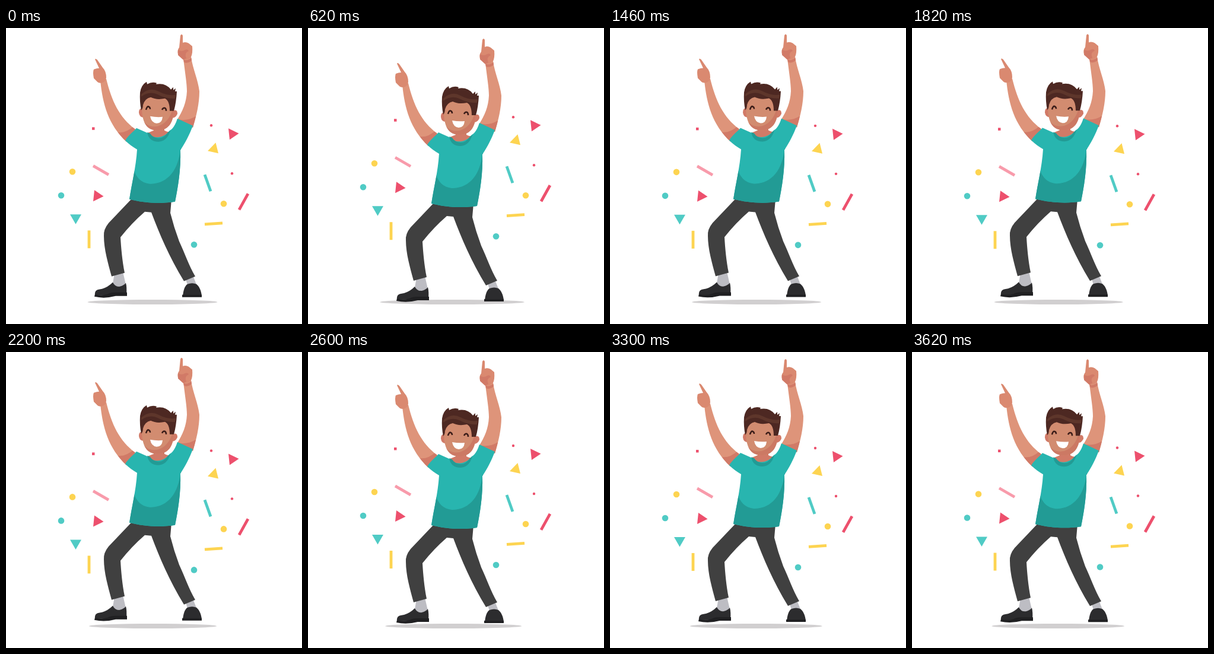
Recreate the animation shown at these times as an HTML page with a canvas. Size 499 by 499 pixels, loop 3640 ms.

```html
<!DOCTYPE html>
<html lang="en">
<head>
<meta charset="utf-8">
<title>Happy dance</title>
<style>
  html, body { margin: 0; width: 100%; height: 100%; overflow: hidden; background: #fff; }
  canvas { display: block; width: 499px; height: 499px; }
</style>
</head>
<body>
<canvas id="stage"></canvas>
<script>
const SIZE = 499, LOOP = 3640, STEP = 20, BOUNCES = 5;
const canvas = document.getElementById('stage');
const ctx = canvas.getContext('2d');
const ratio = window.devicePixelRatio || 1;
canvas.width = canvas.height = Math.round(SIZE * ratio);

const SKIN = '#de947a', HAND = '#da8970', SKIN_DARK = '#d17a67', FACE = '#d28c70';
const SHIRT = '#28b5af', SHIRT_DARK = '#229b95';
const HAIR = '#4d2822', HAIR_LIGHT = '#5e362b';
const PANTS = '#404040', SOCK = '#bdbdc3', SHOE = '#2c2c2e', SOLE = '#202022';
const PINK = '#ed506d', ROSE = '#f89bab', YELLOW = '#fdd451', TEAL = '#50cbc5';

const shape = (color, d, clip) => ({ color, path: new Path2D(d), clip: clip && new Path2D(clip) });
const line = (color, width, d) => ({ color, width, path: new Path2D(d) });

const leftArm = 'M159 89 C163 128 172 163 203 192 L218 171 C191 151 178 123 169 86 Z';
const rightArm = 'M299 52 C302 77 305 94 305 107 C304 126 298 140 288 156 L315 168 C321 148 326 128 326 107 C324 88 315 70 312 49 Z';
const shirt = 'M220 169 L238 177 C248 188 266 187 276 173 C282 170 286 162 289 153 L315 165 ' +
  'C309 181 302 194 294 206 C295 239 290 268 285 293 C260 297 232 295 208 289 ' +
  'C212 262 219 236 221 205 C214 201 207 196 201 190 C206 181 214 176 220 169 Z';
const face = 'M229 128 Q230 114 243 114 L272 114 Q282 116 283 132 C284 157 275 173 256 173 C237 173 228 160 229 128 Z';

const dancer = [
  // feet and legs
  shape(SOCK, 'M183 413 L197 411 L202 433 Q190 441 180 431 Z'),
  shape(SOCK, 'M303 424 L316 420 L322 435 L307 437 Z'),
  shape(SHOE, 'M150 451 C149 442 154 441 162 440 Q172 437 180 429 Q184 437 192 436 Q199 434 202 430 Q204 437 203 450 Z'),
  shape(SOLE, 'M150 449 Q160 452 171 449 Q176 446 184 446 L204 446 L204 452 L185 452 Q166 457 149 453 Z'),
  shape(SHOE, 'M298 452 C299 443 301 435 306 432 Q314 429 321 432 C326 436 329 443 330 452 Z'),
  shape(SOLE, 'M297 450 L330 450 L330 454 L297 454 Z'),
  shape(PANTS, 'M212 288 L173 329 Q164 340 165 351 C165 373 172 397 178 419 L200 413 ' +
    'C196 393 194 371 193 353 Q212 329 234 310 L245 311 C259 348 275 386 300 427 L319 419 ' +
    'C308 400 301 379 292 360 Q283 336 277 312 L279 289 Z'),
  // arms and hands
  shape(SKIN, leftArm),
  shape(SKIN_DARK, 'M188 176 Q202 178 215 166 L222 176 L203 196 L184 182 Z', leftArm),
  shape(SKIN, rightArm),
  shape(SKIN_DARK, 'M286 153 Q304 159 320 149 L318 170 L286 160 Z', rightArm),
  shape(SKIN_DARK, 'M298 53 Q305 57 313 50 L314 54 Q307 61 300 58 Z', rightArm),
  shape(HAND, 'M150 53 Q151 51 154 54 L163 67 Q169 73 169 84 Q168 92 160 93 Q155 93 153 90 L148 85 Q146 74 148 70 Q153 68 157 68 Z'),
  shape(HAND, 'M294 13 Q296 9 298 13 L298 25 Q303 23 308 26 L314 31 Q315 43 312 49 Q306 55 298 53 L290 45 Q288 38 292 33 Z'),
  shape(SKIN_DARK, 'M290 37 Q296 41 302 37 Q307 35 308 39 Q300 42 304 51 L299 54 L290 46 Z'),
  // neck and shirt
  shape(SKIN_DARK, 'M249 164 L267 164 L267 173 Q273 176 275 175 Q270 190 257 191 Q244 188 239 177 L249 173 Z'),
  shape(SHIRT, shirt),
  shape(SHIRT_DARK, 'M215 237 C219 254 231 263 245 263 C273 262 291 239 294 204 L305 204 L302 300 L202 300 Z', shirt),
  shape(SHIRT_DARK, 'M238 176 Q241 192 257 192 Q272 191 277 173 L273 176 Q267 186 257 186 Q247 185 243 178 Z'),
  // head
  shape(SKIN_DARK, 'M231 136 Q224 134 224 143 Q225 151 232 151 Z'),
  shape(SKIN_DARK, 'M281 140 Q289 136 289 145 Q286 152 280 152 Z'),
  shape(FACE, face),
  shape('#cc7964', 'M228 151 C237 174 272 173 281 136 L290 136 L283 178 L230 178 Z', face),
  shape(HAIR, 'M228 139 Q225 124 226 109 Q228 96 237 91 L238 95 Q246 90 254 93 L253 95 Q269 92 278 104 L282 100 ' +
    'L282 105 L286 102 L285 107 L288 107 Q287 126 283 140 L276 140 Q276 123 268 119 Q254 122 244 117 Q234 119 231 130 Q231 136 228 139 Z'),
  shape(HAIR_LIGHT, 'M228 112 Q242 99 257 107 Q272 115 286 113 L285 119 Q270 120 255 112 Q241 106 228 116 Z'),
  line('#3a1c18', 2.5, 'M236 138 Q238 131 241 133 Q243 134 243 137'),
  line('#3a1c18', 2.5, 'M263 138 Q265 134 268 135 Q270 136 270 140'),
  shape('#fff', 'M243 149 Q254 151 264 150 Q263 161 254 161 Q245 160 243 149 Z')
];

const disc = (color, x, y, r) =>
  shape(color, `M${x - r} ${y} a${r} ${r} 0 1 0 ${2 * r} 0 a${r} ${r} 0 1 0 ${-2 * r} 0 Z`);

const confetti = [
  disc(YELLOW, 112, 242, 5.3),
  disc(TEAL, 93, 282, 5.3),
  disc(YELLOW, 367, 296, 5.3),
  disc(TEAL, 317, 365, 5.3),
  disc(PINK, 346, 164, 2.2),
  disc(PINK, 381, 245, 2.2),
  shape(PINK, 'M145 167 h4.5 v4.5 h-4.5 Z'),
  line(ROSE, 4.8, 'M147 232 L173 247'),
  line(TEAL, 4.8, 'M335 247 L345 275'),
  line(YELLOW, 4.8, 'M335 330.5 L365 328.5'),
  line(PINK, 4.8, 'M393 306 L408 279'),
  line(YELLOW, 4.8, 'M140 341 V371'),
  shape(PINK, 'M375 169 L392.5 177.5 L377 188 Z'),
  shape(YELLOW, 'M353.5 193 L358 211 L340 207 Z'),
  shape(PINK, 'M149 273 L164.5 283.5 L147 292 Z'),
  shape(TEAL, 'M108 314 H127 L117.5 330.5 Z')
];

function drawPart({ color, path, width, clip }) {
  ctx.save();
  if (clip) ctx.clip(clip);
  if (width) {
    ctx.strokeStyle = color;
    ctx.lineWidth = width;
    ctx.stroke(path);
  } else {
    ctx.fillStyle = color;
    ctx.fill(path);
  }
  ctx.restore();
}

function drawGroup(parts, dy) {
  ctx.save();
  ctx.translate(0, dy);
  parts.forEach(drawPart);
  ctx.restore();
}

// Bounce height: quick turn at the floor, softer at the top.
function liftAt(time) {
  const a = time / LOOP * BOUNCES * 2 * Math.PI;
  return 13.5 + 15.7 * Math.sin(a) - 0.5 * Math.cos(a) + 1.3 * Math.cos(2 * a);
}

function drawShadow(lift) {
  const left = 121 + 1.15 * lift, right = 365 - 0.6 * lift;
  ctx.fillStyle = '#d1cfd0';
  ctx.beginPath();
  ctx.ellipse((left + right) / 2, 462, (right - left) / 2, 4, 0, 0, 2 * Math.PI);
  ctx.fill();
}

function render(now) {
  const time = Math.floor((now % LOOP) / STEP) * STEP;
  const lift = liftAt(time);
  ctx.setTransform(ratio, 0, 0, ratio, 0, 0);
  ctx.fillStyle = '#fff';
  ctx.fillRect(0, 0, SIZE, SIZE);
  drawShadow(lift);
  drawGroup(confetti, lift - 14);
  drawGroup(dancer, (14 - lift) / 2);
}

let start;
function tick(now) {
  start ??= now;
  render(Math.max(0, now - start));
  requestAnimationFrame(tick);
}
render(0);
requestAnimationFrame(tick);
</script>
</body>
</html>
```
